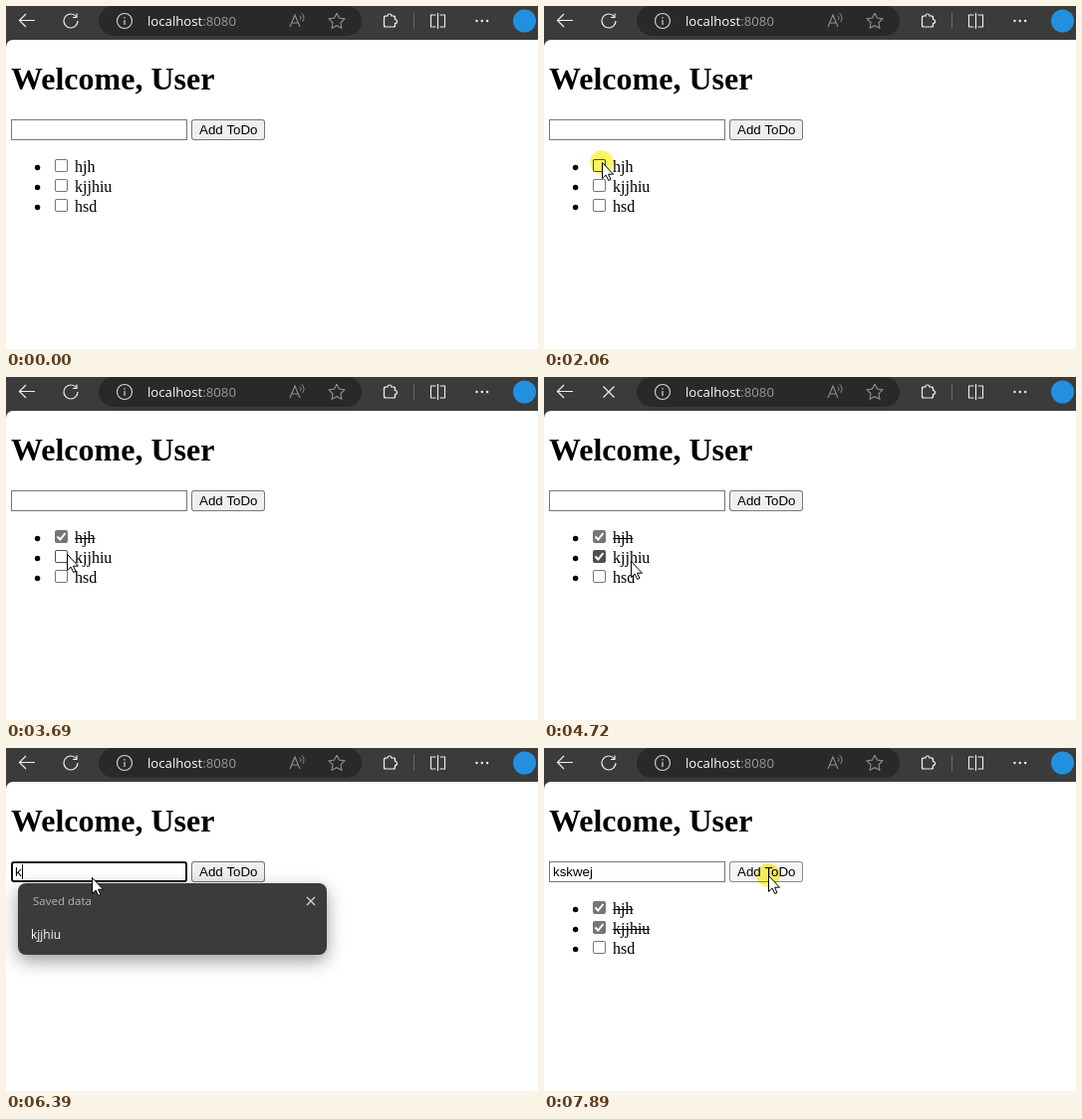
These frames come from a looping animation (534 px wide and 345 px high, 8000 ms). An HTML page with a canvas:

```html
<!DOCTYPE html>
<html lang="en">
<head>
<meta charset="utf-8">
<title>ToDo list</title>
<style>
  html, body { margin: 0; width: 100%; height: 100%; overflow: hidden; background: #fff; }
  canvas { display: block; width: 534px; height: 345px; }
</style>
</head>
<body>
<canvas id="stage" width="534" height="345"></canvas>
<script>
const W = 534, H = 345, LOOP = 8000;
const ctx = document.getElementById('stage').getContext('2d');
const layer = document.createElement('canvas');
layer.width = W;
layer.height = H;
const layerCtx = layer.getContext('2d');

const SERIF = '"Liberation Serif", "Times New Roman", serif';
const SANS = '13.333px "Liberation Sans", Arial, sans-serif';
const UI = '"Open Sans", "Noto Sans", sans-serif';
const BAR = '#3b3b3b', LIGHT = '#f0f0f0', DIM = '#8f8f8f';
const BORDER = '#767676', HOVER = '#4f4f4f';

// Clicks and what follows from them
const CLICKS = [2060, 4020, 6010, 7890];
const CLICK_TIME = 160, RELEASE = 90, LOAD = 150, REPLY = 800;
const FOCUS = CLICKS[2] + 20, BLUR = CLICKS[3];
const TYPED = 'kskwej', TYPE_START = 6310, TYPE_TIME = 340, BLINK = 530;

const INPUT = { x: 5, y: 114, w: 177, h: 21 };
const BUTTON = { x: 186, y: 114, w: 74, h: 21 };
const rowY = i => 154 + 20 * i;
const TODOS = ['hjh', 'kjjhiu', 'hsd'].map((text, i) => ({
  text, y: rowY(i), click: i < 2 ? CLICKS[i] : Infinity
}));

const ENTRY = { x: 22, y: 242 };
const MOVES = [
  { from: 780, to: 1140, x: 50, y: 176 },
  { from: 1370, to: 1750, x: 58, y: rowY(0) + 3 },
  { from: 2480, to: 2900, x: 58, y: rowY(1) + 4 },
  { from: 2960, to: 3260, x: 64, y: 162 },
  { from: 3290, to: 3690, x: 61, y: rowY(1) + 4 },
  { from: 4430, to: 4720, x: 87, y: 185 },
  { from: 4720, to: 5150, x: 92, y: 206 },
  { from: 5250, to: 5710, x: 86, y: 130 },
  { from: 7360, to: 7680, x: 225, y: 128 }
];

const between = (v, a, b) => v >= a && v < b;
const clamp = v => Math.max(0, Math.min(1, v));
const smooth = u => u * u * (3 - 2 * u);
const inside = (p, b) => p && between(p.x, b.x, b.x + b.w) && between(p.y, b.y, b.y + b.h);

function pointerAt(t) {
  if (t < MOVES[0].from) return null;
  let { x, y } = ENTRY;
  for (const m of MOVES) {
    const e = smooth(clamp((t - m.from) / (m.to - m.from)));
    x += (m.x - x) * e;
    y += (m.y - y) * e;
  }
  return { x: Math.round(x), y: Math.round(y) };
}

// Typing speeds up: key i falls on an ease-out curve
const keyTime = i => TYPE_START + TYPE_TIME * (1 - (1 - i / (TYPED.length - 1)) ** 2);
const typedCount = t => [...TYPED].filter((_, i) => keyTime(i) <= t).length;

function text(c, str, x, y, font, color) {
  c.font = font;
  c.fillStyle = color;
  c.fillText(str, x, y);
}

function roundBox(c, x, y, w, h, r, color) {
  c.fillStyle = color;
  c.beginPath();
  c.roundRect(x, y, w, h, r);
  c.fill();
}

function framed({ x, y, w, h }, r, border, fill, line = 1) {
  roundBox(ctx, x, y, w, h, r, border);
  roundBox(ctx, x + line, y + line, w - 2 * line, h - 2 * line, Math.max(0, r - line), fill);
}

// Each path is a flat list of x, y pairs
function lines(c, color, width, ...paths) {
  c.strokeStyle = color;
  c.lineWidth = width;
  c.beginPath();
  for (const p of paths) {
    for (let i = 0; i < p.length; i += 2) c[i ? 'lineTo' : 'moveTo'](p[i], p[i + 1]);
  }
  c.stroke();
}

function cross(c, x, y, r, color) {
  lines(c, color, 1.2, [x - r, y - r, x + r, y + r], [x + r, y - r, x - r, y + r]);
}

function arc(x, y, r, from, to, color, width) {
  ctx.strokeStyle = color;
  ctx.lineWidth = width;
  ctx.beginPath();
  ctx.arc(x, y, r, from, to);
  ctx.stroke();
}

function disc(x, y, r, color) {
  ctx.fillStyle = color;
  ctx.beginPath();
  ctx.arc(x, y, r, 0, 7);
  ctx.fill();
}

function drawStar(x, y) {
  const pts = [];
  for (let i = 0; i <= 10; i++) {
    const a = -Math.PI / 2 + i * Math.PI / 5, r = i % 2 ? 4.2 : 8.3;
    pts.push(x + r * Math.cos(a), y + r * Math.sin(a));
  }
  lines(ctx, DIM, 1.1, pts);
}

// A larger light shape with a smaller dark one on top leaves the outline
function drawPuzzle(x, y) {
  for (const [grow, color] of [[.6, LIGHT], [-.6, BAR]]) {
    roundBox(ctx, x - 6 - grow, y - 5 - grow, 11 + 2 * grow, 11 + 2 * grow, 1.5, color);
    disc(x - .5, y - 5, 2 + grow, color);
    disc(x + 5, y + .5, 2 + grow, color);
  }
}

function drawSplit(x, y) {
  lines(ctx, LIGHT, 1.1, [x, y - 8, x, y + 8]);
  for (const side of [-1, 1]) {
    const near = x + 2 * side, far = x + 7 * side;
    lines(ctx, LIGHT, 1.1, [near, y - 6, far, y - 6, far, y + 6, near, y + 6]);
  }
}

function drawToolbar(loading) {
  ctx.fillStyle = BAR;
  ctx.fillRect(0, 0, W, 42);
  roundBox(ctx, 93, 0, 264, 30, 15, '#292929');

  lines(ctx, LIGHT, 1.2, [29, 14.5, 13.5, 14.5], [20, 8, 13.5, 14.5, 20, 21]);
  if (loading) {
    cross(ctx, 65, 15, 5.5, LIGHT);
  } else {
    arc(65, 15, 7, 0, Math.PI * 1.78, LIGHT, 1.2);
    lines(ctx, LIGHT, 1.2, [71, 7.5, 71, 11.5, 67, 11.5]);
  }

  arc(119, 15, 7.5, 0, 7, '#d8d8d8', 1.1);
  lines(ctx, '#d8d8d8', 1.2, [119, 14, 119, 19], [119, 11, 119, 12.4]);
  const font = '13.2px ' + UI;
  text(ctx, 'localhost', 142, 20, font, '#fff');
  text(ctx, ':8080', 142 + ctx.measureText('localhost').width, 20, font, '#9a9a9a');

  lines(ctx, DIM, 1.1, [285, 21, 290, 9, 295, 21], [287, 17, 293, 17]);
  for (const r of [3, 6]) arc(293, 12, r, -.9, .7, DIM, 1);
  drawStar(332, 15.5);
  drawPuzzle(385.5, 15);
  lines(ctx, '#6a6a6a', 1, [409.5, 7, 409.5, 23]);
  drawSplit(433.5, 15);
  for (let i = 0; i < 3; i++) disc(472.5 + i * 5.3, 15, 1.2, LIGHT);
  disc(520.5, 15, 11.5, '#2390df');

  roundBox(ctx, 0, 34, W, H, [7, 0, 0, 0], '#fff');
}

function drawTodo({ text: label, y, click }, t, p) {
  const font = '16px ' + SERIF;
  ctx.font = font;
  const width = ctx.measureText(label).width;
  const checked = t >= click + RELEASE;
  const hover = inside(p, { x: 49, y: y - 1, w: 20 + width, h: 19 });
  const tone = hover ? HOVER : BORDER;
  disc(31.6, y + 8.5, 2.7, '#000');
  framed({ x: 49, y, w: 13, h: 13 }, 2, tone, checked ? tone : '#fff');
  if (checked) lines(ctx, '#fff', 2, [51.5, y + 6.5, 54.3, y + 9.5, 59.5, y + 3]);
  text(ctx, label, 69, y + 13, font, '#000');
  if (t >= click + REPLY) ctx.fillRect(69, y + 8, width, 1);
}

function drawForm(t, p) {
  if (between(t, FOCUS, BLUR)) framed(INPUT, 3, '#101010', '#fff', 2);
  else framed(INPUT, 0, inside(p, INPUT) && t < BLUR ? HOVER : BORDER, '#fff');

  const count = typedCount(t), value = TYPED.slice(0, count);
  text(ctx, value, 9, 129, SANS, '#000');
  const since = t - (count ? keyTime(count - 1) : FOCUS);
  if (between(t, FOCUS, BLUR) && Math.floor(since / BLINK) % 2 === 0) {
    ctx.fillRect(Math.round(9 + ctx.measureText(value).width), 117, 1, 15);
  }

  const hover = inside(p, BUTTON), active = t >= BLUR;
  const border = active ? '#8d8d8d' : hover ? HOVER : BORDER;
  framed(BUTTON, 3, border, active ? '#f5f5f5' : hover ? '#e5e5e5' : '#efefef');
  text(ctx, 'Add ToDo', 194, 129, SANS, '#000');
}

function drawPopup(t) {
  const alpha = clamp((t - FOCUS - 30) / 90) * clamp((6545 - t) / 150);
  if (!alpha) return;
  const items = t < TYPE_START + 30 ? ['hjh', 'kjjhiu', 'hsd', 'jkh', 'sdf'] : ['kjjhiu'];
  const c = layerCtx;
  c.clearRect(0, 0, W, H);
  c.shadowColor = 'rgba(0,0,0,.4)';
  c.shadowBlur = 18;
  c.shadowOffsetY = 6;
  roundBox(c, 12, 136, 310, 40 + 32 * items.length, 8, BAR);
  c.shadowColor = 'transparent';
  text(c, 'Saved data', 27, 158, '11.5px ' + UI, '#b4b4b4');
  cross(c, 306, 154, 4, '#d8d8d8');
  items.forEach((s, i) => text(c, s, 25, 192 + 32 * i, '12px ' + UI, '#fff'));
  ctx.globalAlpha = alpha;
  ctx.drawImage(layer, 0, 0);
  ctx.globalAlpha = 1;
}

function drawBeam(x, y) {
  lines(ctx, '#222', 1, [x, y - 7, x, y + 8]);
  for (const side of [-1, 1]) {
    for (const end of [y - 6.5, y + 8.5]) {
      lines(ctx, '#222', 1, [x + .5 * side, end, x + 3.5 * side, end]);
    }
  }
}

const ARROW = new Path2D('M.5 .5v16l3.7-3.4 2.5 5.4 2.3-1-2.4-5.3h4.9z');

function drawArrow(x, y) {
  ctx.save();
  ctx.translate(x, y);
  ctx.fillStyle = '#fff';
  ctx.fill(ARROW);
  ctx.strokeStyle = '#000';
  ctx.lineWidth = 1;
  ctx.stroke(ARROW);
  ctx.restore();
}

function drawPointer(t, p) {
  if (CLICKS.some(c => between(t, c, c + CLICK_TIME))) {
    ctx.globalCompositeOperation = 'multiply';
    disc(p.x, p.y, 11.8, '#fdf462');
    ctx.globalCompositeOperation = 'source-over';
  }
  // The arrow stays from the first key until the mouse moves again
  const resting = between(t, TYPE_START, MOVES.at(-1).from);
  if (inside(p, INPUT) && !resting) drawBeam(p.x + 2.5, p.y);
  else drawArrow(p.x, p.y);
}

function draw(t) {
  const p = pointerAt(t);
  drawToolbar(TODOS.some(d => between(t, d.click + LOAD, d.click + REPLY)));
  text(ctx, 'Welcome, User', 5, 84, 'bold 32px ' + SERIF, '#000');
  drawForm(t, p);
  for (const todo of TODOS) drawTodo(todo, t, p);
  drawPopup(t);
  if (p) drawPointer(t, p);
}

const start = performance.now();
function tick() {
  draw((performance.now() - start) % LOOP);
  requestAnimationFrame(tick);
}
tick();
</script>
</body>
</html>
```
